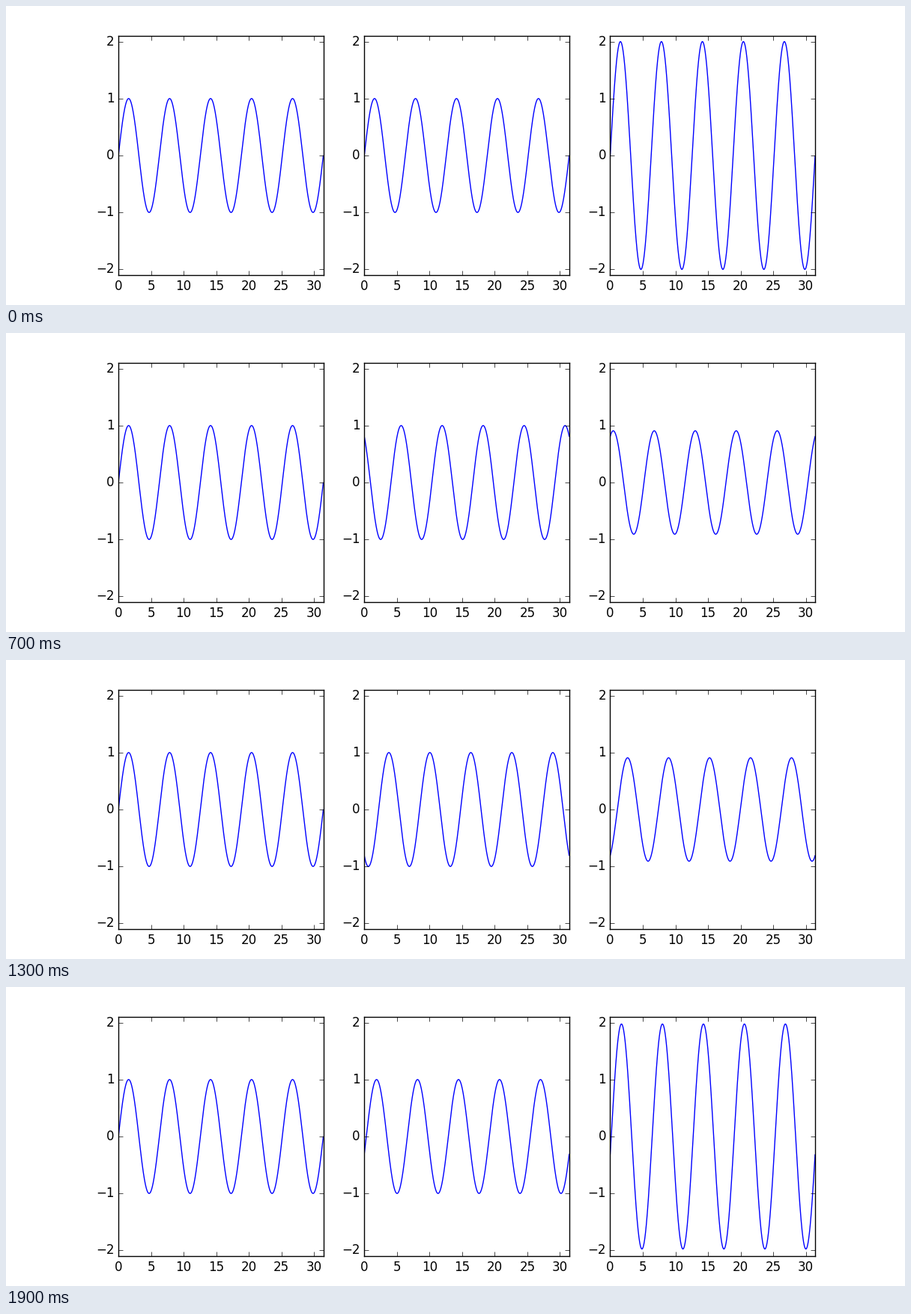
Recreate the animation shown at these times as a matplotlib script. Size 1200 by 400 pixels, loop 2000 ms.

```python
import numpy as np
import matplotlib.pyplot as plt
from matplotlib.animation import FuncAnimation

FRAMES = 20
INTERVAL = 100  # ms

plt.style.use("classic")
plt.rcParams["font.family"] = "DejaVu Sans"

x = np.arange(0, 10 * np.pi, 0.01)
still = np.sin(x)

fig, axes = plt.subplots(1, 3, figsize=(12, 4), dpi=100, facecolor="white")
lines = []
for ax in axes:
    ax.set_xlim(0, 10 * np.pi)
    ax.set_ylim(-2.1, 2.1)
    ax.set_xticks(range(0, 31, 5))
    ax.set_yticks(range(-2, 3))
    lines += ax.plot(x, still, color="blue", lw=1)


def update(i):
    """Shift the middle wave by one phase step and add it to the still wave."""
    moving = np.sin(x + 2 * np.pi * i / FRAMES)
    lines[1].set_ydata(moving)
    lines[2].set_ydata(still + moving)
    return lines[1:]


anim = FuncAnimation(fig, update, frames=FRAMES, interval=INTERVAL,
                     repeat=True, repeat_delay=0)
plt.show()
```
